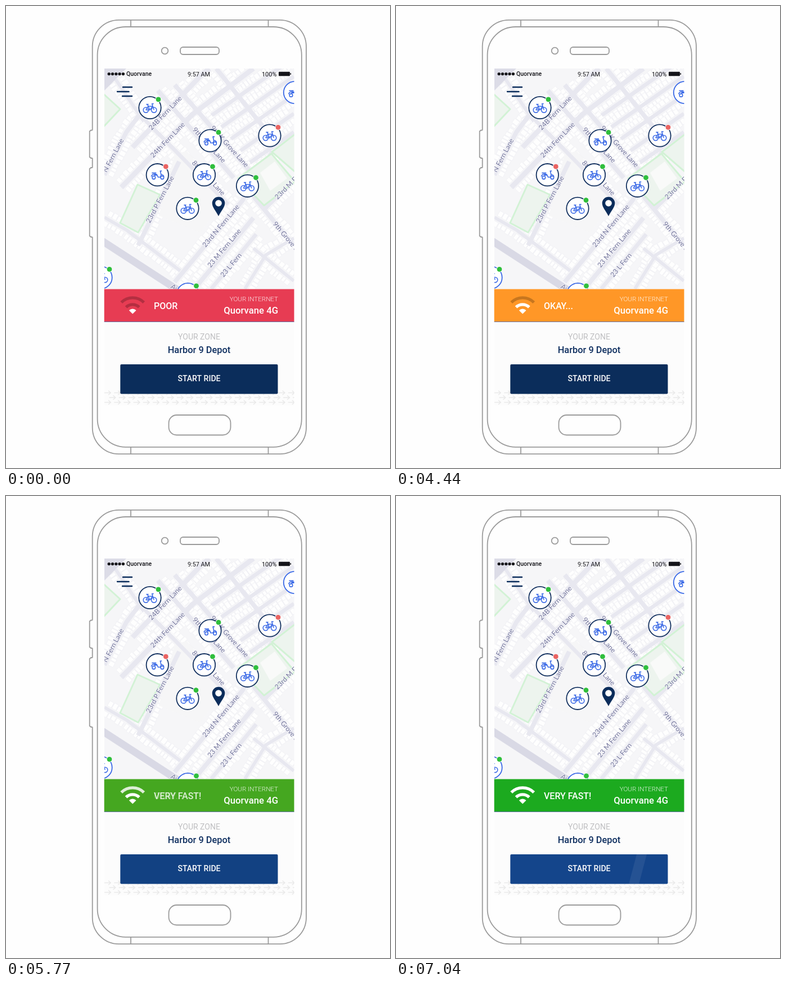
Write an HTML page with a canvas that moves like this. It is 683 by 820 pixels and loops after 8 s.

```html
<!DOCTYPE html>
<html lang="en">
<head>
<meta charset="utf-8">
<title>Ride app: network status</title>
<style>
html, body { margin: 0; width: 100%; height: 100%; overflow: hidden; background: #fefefe; }
canvas { display: block; width: 683px; height: 820px; }
</style>
</head>
<body>
<canvas id="stage"></canvas>
<script>
const W = 683, H = 820, LOOP = 8000;
const NAVY = '#0b2d5b', BLUE = '#3a69e6', GREEN = '#2fbe3c', CORAL = '#ea6462';
const dpr = window.devicePixelRatio || 1;

function sized(c) {
  c.width = W * dpr;
  c.height = H * dpr;
  const g = c.getContext('2d');
  g.scale(dpr, dpr);
  return g;
}
const stage = sized(document.getElementById('stage'));
const backdrop = document.createElement('canvas');
let g = sized(backdrop);

// ---- helpers ----
function path(pts, close) {
  g.beginPath();
  for (let i = 0; i < pts.length; i += 2) g.lineTo(pts[i], pts[i + 1]);
  if (close) g.closePath();
}
function line(pts, color, width) {
  path(pts);
  g.strokeStyle = color;
  g.lineWidth = width;
  g.stroke();
}
function circle(x, y, r, fill, stroke, width) {
  g.beginPath();
  g.arc(x, y, r, 0, 7);
  if (fill) { g.fillStyle = fill; g.fill(); }
  if (stroke) { g.strokeStyle = stroke; g.lineWidth = width; g.stroke(); }
}
function box(x, y, w, h, r) {
  g.beginPath();
  g.roundRect(x, y, w, h, r);
}
function rect(x, y, w, h, color) {
  g.fillStyle = color;
  g.fillRect(x, y, w, h);
}
function text(s, x, y, size, weight, color, align = 'left') {
  g.font = `${weight} ${size}px Roboto, Arial, sans-serif`;
  g.textAlign = align;
  g.fillStyle = color;
  g.fillText(s, x, y);
}
let seed = 11;
function rnd() {
  seed = (seed * 16807) % 2147483647;
  return seed / 2147483647;
}

// ---- map ----
function streets() {
  const list = [
    [9, 225, 251, 348, 122, 362, 111],
    [9, 205, 322, 332, 192, 440, 111],
    [8, 235, 425, 308, 276],
    [8, 175, 300, 214, 224, 258, 166],
    [8, 300, 490, 420, 346, 474, 258],
    [8, 340, 496, 440, 376],
    [7, 365, 502, 445, 405],
    [8, 300, 140, 440, 300],
    [8, 270, 150, 405, 305],
    [7, 245, 200, 395, 352],
    [8, 432, 328, 512, 425],
    [8, 458, 362, 512, 308],
    [6, 425, 502, 462, 442, 512, 412],
    [6, 440, 430, 512, 488],
    [6, 175, 375, 215, 398, 310, 470],
    [6, 195, 130, 245, 205],
    [8, 374, 111, 478, 240]
  ];
  for (let i = 0; i < 5; i++) {
    list.push([7, 366 + i * 17, 194 + i * 21, 512, 92 + i * 33]);
  }
  return list;
}
function houses(width, x1, y1, x2, y2) {
  const len = Math.hypot(x2 - x1, y2 - y1);
  g.save();
  g.translate(x1, y1);
  g.rotate(Math.atan2(y2 - y1, x2 - x1));
  g.lineWidth = 0.8;
  for (const side of [-1, 1]) {
    for (let x = 3; x < len - 5;) {
      const w = 5 + rnd() * 4, d = 8 + rnd() * 4;
      const y = side * (width / 2 + 2 + d / 2) - d / 2;
      g.fillStyle = '#fefefe';
      g.strokeStyle = '#f0f0f4';
      g.fillRect(x, y, w, d);
      g.strokeRect(x, y, w, d);
      x += w + 1.2;
    }
  }
  g.restore();
}
function park(pts) {
  path(pts, true);
  g.fillStyle = '#edf4ee';
  g.fill();
  g.strokeStyle = '#d2f2d5';
  g.lineWidth = 3;
  g.stroke();
}
function label(s, x, y, deg) {
  g.save();
  g.translate(x, y);
  g.rotate(deg * Math.PI / 180);
  g.font = '12.3px Lato, "Open Sans", sans-serif';
  g.textAlign = 'left';
  g.strokeStyle = 'rgba(250,250,253,.8)';
  g.lineWidth = 2;
  g.strokeText(s, 0, 0);
  g.fillStyle = '#70729a';
  g.fillText(s, 0, 0);
  g.restore();
}
function bike() {
  for (const x of [-7.2, 7.2]) circle(x, 3.6, 4.6, null, BLUE, 1.6);
  line([-7.2, 3.6, -3.4, -3, 4.6, -3, 0, 3.6, -7.2, 3.6], BLUE, 1.5);
  line([0, 3.6, -4.4, -6.2], BLUE, 1.5);
  line([-6.6, -6.4, -2.4, -6.4], BLUE, 1.7);
  line([7.2, 3.6, 3.6, -7.6, 6.8, -7.6], BLUE, 1.5);
}
function scooter() {
  circle(-6.5, 4.4, 2.8, null, BLUE, 1.6);
  circle(8.6, 4.4, 2.8, null, BLUE, 1.6);
  g.beginPath();
  g.moveTo(-11, 2.5);
  g.quadraticCurveTo(-10, -2, -4, -2);
  g.quadraticCurveTo(0, -2, 1, 3.5);
  g.lineTo(5, 3.5);
  g.quadraticCurveTo(7, 1, 6.4, -2);
  g.lineTo(5, -7.4);
  g.lineTo(8, -7.4);
  g.moveTo(6.5, -1);
  g.quadraticCurveTo(11, -1, 11.5, 3);
  g.moveTo(-10, -3.8);
  g.lineTo(-2, -3.8);
  g.strokeStyle = BLUE;
  g.lineWidth = 1.6;
  g.stroke();
  g.fillStyle = BLUE;
  g.fillRect(-6, -2, 5, 3);
}
function marker(x, y, icon, dot, ring = '#12305f') {
  circle(x, y, 19.7, '#fff', ring, 1.8);
  g.save();
  g.translate(x, y + 0.5);
  icon();
  g.restore();
  if (dot) circle(x + 15, y - 14.7, 4.9, dot, '#fff', 1);
}
function pin(x, y) {
  g.beginPath();
  g.moveTo(x, y + 23);
  g.bezierCurveTo(x - 5, y + 13, x - 11.3, y + 7, x - 11.3, y);
  g.arc(x, y, 11.3, Math.PI, 0);
  g.bezierCurveTo(x + 11.3, y + 7, x + 5, y + 13, x, y + 23);
  g.fillStyle = NAVY;
  g.fill();
  circle(x, y, 5.8, '#fff');
}
function drawMap() {
  g.save();
  g.beginPath();
  g.rect(175, 111, 337.5, 391.5);
  g.clip();
  rect(175, 111, 338, 392, '#f6f6f8');
  const roads = streets();
  for (const [w, ...p] of roads) {
    for (let i = 0; i + 3 < p.length; i += 2) houses(w, p[i], p[i + 1], p[i + 2], p[i + 3]);
  }
  path([300, 262, 322, 258, 392, 340, 345, 402, 272, 372], true);
  g.fillStyle = '#f6f6f7';
  g.fill();
  g.lineJoin = 'round';
  for (const [w, ...p] of roads) line(p, '#e8e8f0', w);
  park([234, 317, 274, 335, 235, 402, 203, 385]);
  park([170, 153, 203, 183, 170, 218]);
  park([473, 259, 516, 226, 516, 296]);
  park([413, 306, 472, 262, 514, 312, 459, 354]);
  path([452, 296, 478, 276, 500, 306, 470, 328], true);
  g.fillStyle = '#f9faf9';
  g.fill();
  line([165, 413, 310, 507], '#d9d9e5', 13);
  path([175, 111, 214, 111, 175, 150], true);
  g.fillStyle = '#dcdce7';
  g.fill();

  label('24B Fern Lane', 259, 221, -46);
  label('24th Fern Lane', 262, 270, -46);
  label('N Fern Lane', 179, 296, -62);
  label('23rd P Fern Lane', 256, 386, -62);
  label('23rd N Fern Lane', 355, 429, -50);
  label('23 M Fern Lane', 364, 465, -50);
  label('23 L Fern', 387, 482, -50);
  label('23rd M Fern', 483, 344, -45);
  label('9th K Grove Lane', 363, 217, 48);
  label('9th', 331, 220, 48);
  label('Lane', 368, 260, 48);
  label('8th', 330, 279, 48);
  label('Lane', 367, 318, 48);
  label('9th Grove Lane', 474, 387, 50);
  label('Av', 292, 500, 32);

  marker(256, 180.5, bike, GREEN);
  marker(363, 239, scooter, GREEN);
  marker(469, 230, bike, CORAL);
  marker(269.3, 299.7, scooter, CORAL);
  marker(352.5, 299.7, bike, GREEN);
  marker(429.5, 319.3, bike, GREEN);
  marker(323, 359.3, bike, GREEN);
  marker(513.5, 153.5, scooter, null, BLUE);
  marker(169, 482, bike, GREEN, BLUE);
  marker(323.5, 511.5, bike, GREEN, BLUE);
  pin(378, 350);
  g.restore();
}

// ---- phone and fixed interface ----
function drawPhone() {
  g.strokeStyle = '#9b9b9b';
  g.lineWidth = 1.8;
  box(153.7, 24.8, 380.3, 770.4, 47); g.stroke();
  box(162.6, 37, 363.2, 745.8, 50); g.stroke();
  box(310, 73, 69, 13, 5); g.stroke();
  box(289.5, 726, 110, 35.5, 14); g.stroke();
  circle(282.5, 79.5, 5.8, null, '#9b9b9b', 1.8);
  for (const x of [222, 466.5]) {
    line([x, 25, x, 37], '#9b9b9b', 1.8);
    line([x, 783, x, 795], '#9b9b9b', 1.8);
  }
  for (const [y, h] of [[220.5, 49.5], [287, 123]]) {
    rect(152, y, 4, h, '#fefefe');
    line([153.7, y, 151, y, 148.7, y + 2, 148.7, y + h - 2, 151, y + h, 153.7, y + h], '#9b9b9b', 1.8);
  }
}
function arrow(x, y) {
  line([x, y, x + 11, y], '#e9e9e9', 1.5);
  line([x + 7, y - 3.8, x + 11.3, y, x + 7, y + 3.8], '#e9e9e9', 1.5);
}
function drawPanel() {
  rect(175, 560, 337.5, 149, '#fcfcfc');
  g.save();
  g.beginPath();
  g.rect(175, 675, 337.5, 34);
  g.clip();
  for (let r = 0; r < 3; r++) {
    for (let x = 175 + (r % 2) * 8.5; x < 513; x += 17.2) arrow(x, 686.5 + r * 8.5);
  }
  g.restore();
  text('YOUR ZONE', 343.5, 592, 14, 400, '#bfbfc1', 'center');
  text('Harbor 9 Depot', 343.5, 615.8, 16.4, 500, '#0f2f60', 'center');
}
function drawStatus() {
  for (let i = 0; i < 5; i++) circle(183.2 + i * 6.3, 120.6, 2.7, '#15151a');
  text('Quorvane', 214, 124.3, 10.5, 500, '#15151a');
  text('9:57 AM', 343, 124.5, 10.8, 400, '#15151a', 'center');
  text('100%', 481.5, 124.5, 11, 400, '#15151a', 'right');
  g.fillStyle = '#15151a';
  box(485, 116.7, 20, 7.6, 1.2); g.fill();
  rect(505.6, 119, 1.4, 3, '#15151a');
  g.lineCap = 'round';
  line([208, 144, 224, 144], NAVY, 2.4);
  line([198, 152, 218.5, 152], NAVY, 2.4);
  line([207, 160, 224, 160], NAVY, 2.4);
  g.lineCap = 'butt';
}

// ---- moving parts ----
const RED = [231, 60, 83], ORANGE = [255, 151, 39], LIME = [28, 170, 31];
const DARK = [11, 45, 91], BRIGHT = [20, 69, 139];

const mix = (a, b, p) => a.map((v, i) => v + (b[i] - v) * p);
const rgb = c => `rgb(${c.map(Math.round).join(',')})`;
const clamp = v => Math.min(1, Math.max(0, v));
const ease = (t, from, dur) => 0.5 - 0.5 * Math.cos(Math.PI * clamp((t - from) / dur));

function arc(r, lit) {
  for (const color of [`rgba(0,0,0,${0.22 * (1 - lit)})`, `rgba(255,255,255,${lit})`]) {
    g.beginPath();
    g.arc(225.2, 546.5, r, -Math.PI * 0.747, -Math.PI * 0.253);
    g.strokeStyle = color;
    g.lineWidth = 5.4;
    g.stroke();
  }
}
function wifi(mid, outer) {
  g.beginPath();
  g.moveTo(225.2, 546.5);
  g.arc(225.2, 546.5, 9, -Math.PI * 0.75, -Math.PI * 0.25);
  g.fillStyle = '#fff';
  g.fill();
  arc(16.6, mid);
  arc(28.6, outer);
}
function fadeText(s, alpha) {
  if (alpha <= 0) return;
  g.globalAlpha = alpha;
  text(s, 263, 538, 16, 500, '#fff');
  g.globalAlpha = 1;
}
function banner(okay, fast) {
  rect(174.7, 502.5, 337.8, 58, rgb(mix(mix(RED, ORANGE, okay), LIME, fast)));
  rect(174.7, 560, 337.8, 0.9, '#5567a0');
  wifi(okay, fast);
  fadeText('POOR', 1 - okay);
  fadeText('OKAY...', okay * (1 - fast));
  fadeText('VERY FAST!', fast);
  text('YOUR INTERNET', 484, 523.5, 11.6, 300, 'rgba(255,255,255,.88)', 'right');
  text('Quorvane 4G', 484, 545.8, 16.7, 500, '#fff', 'right');
}
function button(t, fast) {
  g.save();
  box(203.3, 636, 280.2, 52.5, 2);
  g.fillStyle = rgb(mix(DARK, BRIGHT, fast));
  g.fill();
  g.clip();
  const x = 430 - Math.max(0, 7040 - t) * 0.44;
  if (x > 185) {
    path([x - 2, 636, x + 16, 636, x + 2, 689, x - 16, 689], true);
    g.fillStyle = 'rgba(255,255,255,.07)';
    g.fill();
  }
  g.restore();
  text('START RIDE', 343.5, 666.3, 14.1, 500, '#fff', 'center');
}

drawPhone();
drawMap();
drawPanel();
drawStatus();
g = stage;

function frame(now) {
  const t = now % LOOP;
  const okay = ease(t, 400, 2000), fast = ease(t, 4400, 1900);
  g.fillStyle = '#fefefe';
  g.fillRect(0, 0, W, H);
  g.drawImage(backdrop, 0, 0, W, H);
  banner(okay, fast);
  button(t, fast);
  requestAnimationFrame(frame);
}
frame(performance.now());
</script>
</body>
</html>
```
